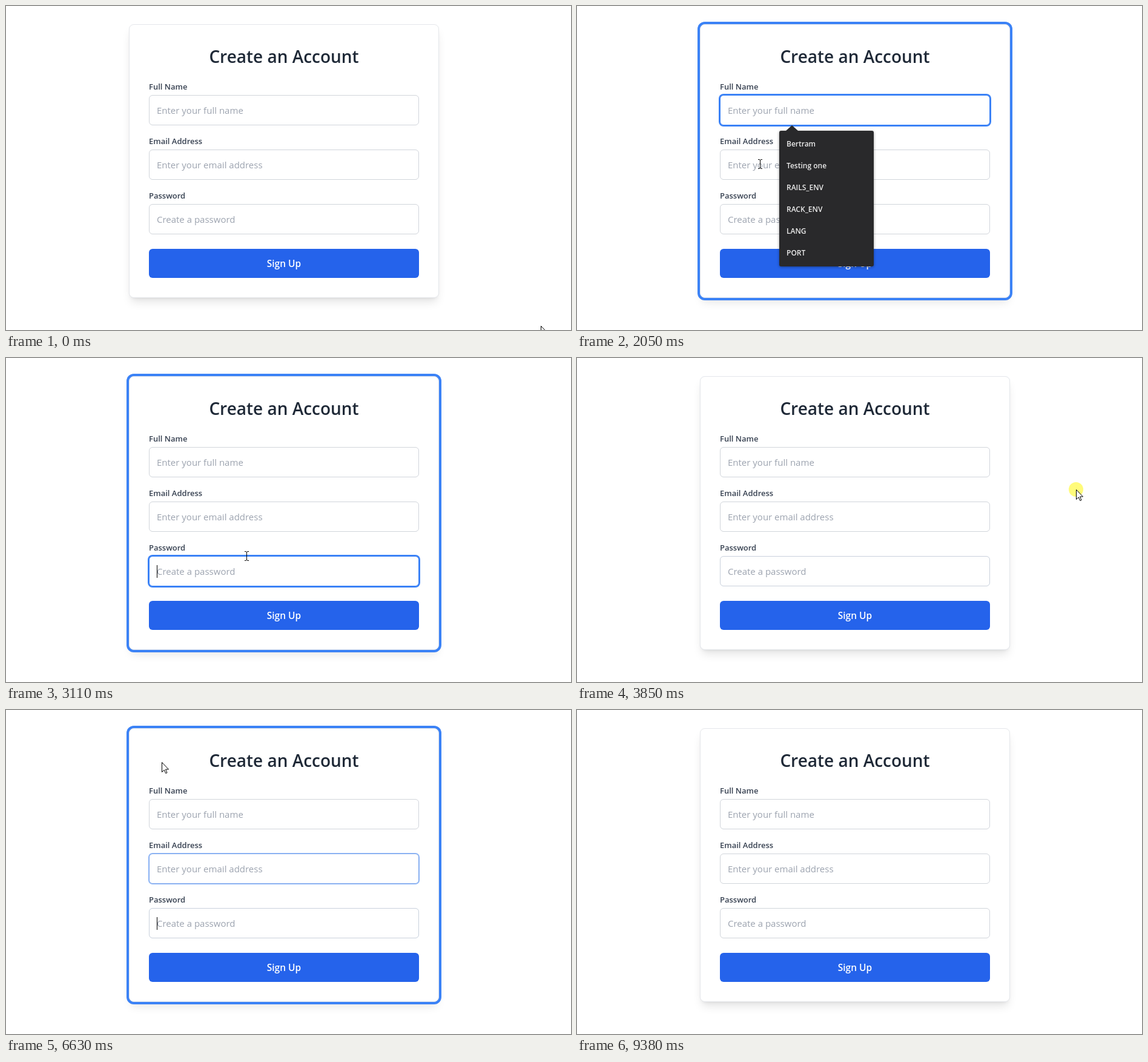
Recreate the animation shown at these times as an HTML page. Size 933 px wide and 535 px high, loop 9.91 s.

```html
<!DOCTYPE html>
<html lang="en">
<head>
<meta charset="utf-8">
<title>Sign-up form</title>
<style>
html, body { margin: 0; width: 100%; height: 100%; overflow: hidden; background: #fff; }
body { position: relative; font-family: "Open Sans", "Noto Sans", sans-serif; cursor: none; }
div, h1, label, svg { position: absolute; box-sizing: border-box; margin: 0; white-space: nowrap; }
#card { left: 203px; top: 30px; width: 512px; height: 452px; border: 1px solid #e5e7eb; border-radius: 8px; background: #fff; }
h1 { left: 203px; width: 512px; top: 65px; text-align: center; font: 600 28px/36px "Open Sans", sans-serif; color: #1f2937; }
label { left: 236px; font-size: 13px; line-height: 20px; font-weight: 600; color: #374151; }
.field { left: 236px; width: 446px; height: 50px; padding-left: 12px; border: 1px solid; border-radius: 6px; background: #fff; font-size: 15px; line-height: 48px; color: #9ca3af; }
.caret { left: 12px; top: 14px; width: 1px; height: 21px; background: #000; }
#button { left: 236px; top: 401px; width: 446px; height: 48px; border-radius: 6px; text-align: center; font-size: 15.5px; line-height: 48px; font-weight: 600; color: #fff; }
.menu { left: 334px; height: 224px; padding: 4px 12px; border-radius: 3px; background: #29292b; box-shadow: 0 1px 4px #0006; color: #ececec; font-size: 12px; line-height: 36px; font-weight: 600; white-space: pre; }
.menu::before { content: ""; position: absolute; left: 11px; top: -9px; border: 10px solid transparent; border-top: 0; border-bottom: 9px solid #29292b; }
#pointer { left: 0; top: 0; overflow: visible; }
</style>
</head>
<body>
<div id="card"></div>
<h1>Create an Account</h1>
<div id="button">Sign Up</div>
<svg id="pointer" width="1" height="1">
  <circle r="12" fill="#fff700" fill-opacity=".52"/>
  <g id="arrow" fill="#fff" stroke="#000"><path d="M.5.5V16.5L4.2 13 6.8 18.6 9 17.6 6.5 12H11.5Z"/></g>
  <g id="beam" fill="none" stroke="#000"><path d="M-3-7.5H-1L.5-6.5 2-7.5H4M.5-6.5V6.5M-3 7.5H-1L.5 6.5 2 7.5H4"/></g>
  <g id="hand" fill="#fff" stroke="#000" transform="translate(-5.5 -.5)"><path d="M4.5 14V2.2a1.6 1.6 0 0 1 3.2 0V8.5a1.5 1.5 0 0 1 2.6.6a1.5 1.5 0 0 1 2.6.7a1.4 1.4 0 0 1 2.4.9V15c0 3-1 4-1.5 7H6.5C6 19 3.5 17 1.2 13.5c-.8-1.6 1-2.6 2-1.4Z"/><path d="M7.7 8V13M10.3 9.2V13M12.9 10V13"/></g>
</svg>
<script>
const LOOP = 9910;
const $ = id => document.getElementById(id);
const card = $("card"), button = $("button"), pointer = $("pointer");

function add(tag, className, text, style) {
  const el = document.createElement(tag);
  el.className = className;
  el.textContent = text;
  Object.assign(el.style, style);
  document.body.insertBefore(el, pointer);
  return el;
}

// Focus spans are [start, end] in ms.
const fields = [
  ["Full Name", "Enter your full name", [[1180, 2110], [5830, 6030]]],
  ["Email Address", "Enter your email address", [[2110, 2900], [6030, 6560]]],
  ["Password", "Create a password", [[2900, 3720], [6560, 7720]]]
].map(([name, hint, spans], i) => {
  const top = 147 + 90 * i;
  add("label", "", name, { top: top - 24 + "px" });
  const box = add("div", "field", hint, { top: top + "px" });
  const caret = document.createElement("div");
  caret.className = "caret";
  box.append(caret);
  return { box, caret, top, spans };
});
const cardSpans = [[1180, 3720], [5830, 8640]];
const buttonSpans = [[7720, 8640]];

const menus = [
  [1180, 2110, 206, 156, "Bertram\nTesting one\nRAILS_ENV\nRACK_ENV\nLANG\nPORT"],
  [2110, 2900, 296, 231, "bertram@zumblegarnet.com\n05550100234\ntolvers.bertram42@plovo.com\norin+4@zumblegarnet.com\npelwickstrand@plovo.com\norin+4@zuKJHGFF"]
].map(([start, end, top, width, text]) =>
  ({ start, end, el: add("div", "menu", text, { top: top + "px", width: width + "px" }) }));

const path = [
  [0, 883, 528], [40, 883, 528], [330, 897, 440], [1050, 398, 176], [1630, 398, 176],
  [1900, 312, 190], [2060, 302, 262], [2480, 302, 262], [2580, 300, 280], [2850, 300, 352],
  [2960, 300, 352], [3510, 824, 217], [3880, 824, 217], [4500, 140, 141], [5260, 140, 141],
  [5500, 257, 86], [7060, 257, 86], [7450, 400, 466], [7700, 591, 422], [8060, 591, 422],
  [8250, 767, 321], [8400, 767, 321], [8510, 786, 303], [9130, 786, 303], [9380, 816, 540], [LOOP, 816, 540]
];
const clicks = [1180, 2110, 2900, 3830, 4640, 7720, 8760];

const clamp = v => Math.min(1, Math.max(0, v));
const smooth = v => (v = clamp(v), v * v * (3 - 2 * v));
const within = (t, start, end) => t >= start && t < end;
const level = (t, spans) => Math.max(...spans.map(([start, end]) =>
  smooth((t - start - 50) / 150) - smooth((t - end) / 150)));
const mix = (a, b, k) => `rgb(${a.map((v, i) => v + (b[i] - v) * k)})`;

function position(t) {
  const i = path.findIndex(p => p[0] > t);
  const [t0, x0, y0] = path[i - 1], [t1, x1, y1] = path[i];
  const k = smooth((t - t0) / (t1 - t0));
  return [x0 + (x1 - x0) * k, y0 + (y1 - y0) * k];
}

const overButton = t => {
  const [x, y] = position(Math.max(0, t));
  return within(x, 236, 682) && within(y, 401, 449);
};

function draw(t) {
  const ring = level(t, cardSpans);
  card.style.boxShadow = `0 0 0 ${4 * ring}px rgba(59,130,246,${ring}), 0 10px 15px -3px #0000001a, 0 4px 6px -4px #0000001a`;

  for (const { box, caret, spans } of fields) {
    const focus = level(t, spans);
    const active = spans.find(([start, end]) => within(t, start, end));
    const fresh = active && t - active[0] < 65;
    box.style.borderColor = fresh ? "#101010" : mix([209, 213, 219], [59, 130, 246], focus);
    box.style.boxShadow = fresh ? "0 0 0 1px #101010" : `0 0 0 ${2 * focus}px rgba(59,130,246,${focus})`;
    caret.hidden = !active || (t - active[0]) % 1060 >= 530;
  }

  for (const { el, start, end } of menus) el.hidden = !within(t, start, end);

  // The hover colour trails the pointer by 150 ms.
  let hover = 0;
  for (let lag = 0; lag < 150; lag += 15) hover += overButton(t - lag) / 10;
  const press = level(t, buttonSpans);
  button.style.background = mix([37, 99, 235], [29, 78, 216], hover);
  button.style.boxShadow = `0 0 0 ${4 * press}px rgba(147,197,253,${press})`;

  const [x, y] = position(t);
  const overField = within(x, 236, 682) && fields.some(f => within(y, f.top, f.top + 50));
  const shape = overButton(t) ? "hand" : overField ? "beam" : "arrow";
  for (const id of ["arrow", "beam", "hand"]) $(id).style.display = id === shape ? "" : "none";
  pointer.style.transform = `translate(${Math.round(x)}px, ${Math.round(y)}px)`;
  pointer.firstElementChild.style.display = clicks.some(c => within(t, c, c + 130)) ? "" : "none";
}

const begin = performance.now();
function tick() {
  draw((performance.now() - begin) % LOOP);
  requestAnimationFrame(tick);
}
tick();
</script>
</body>
</html>
```
